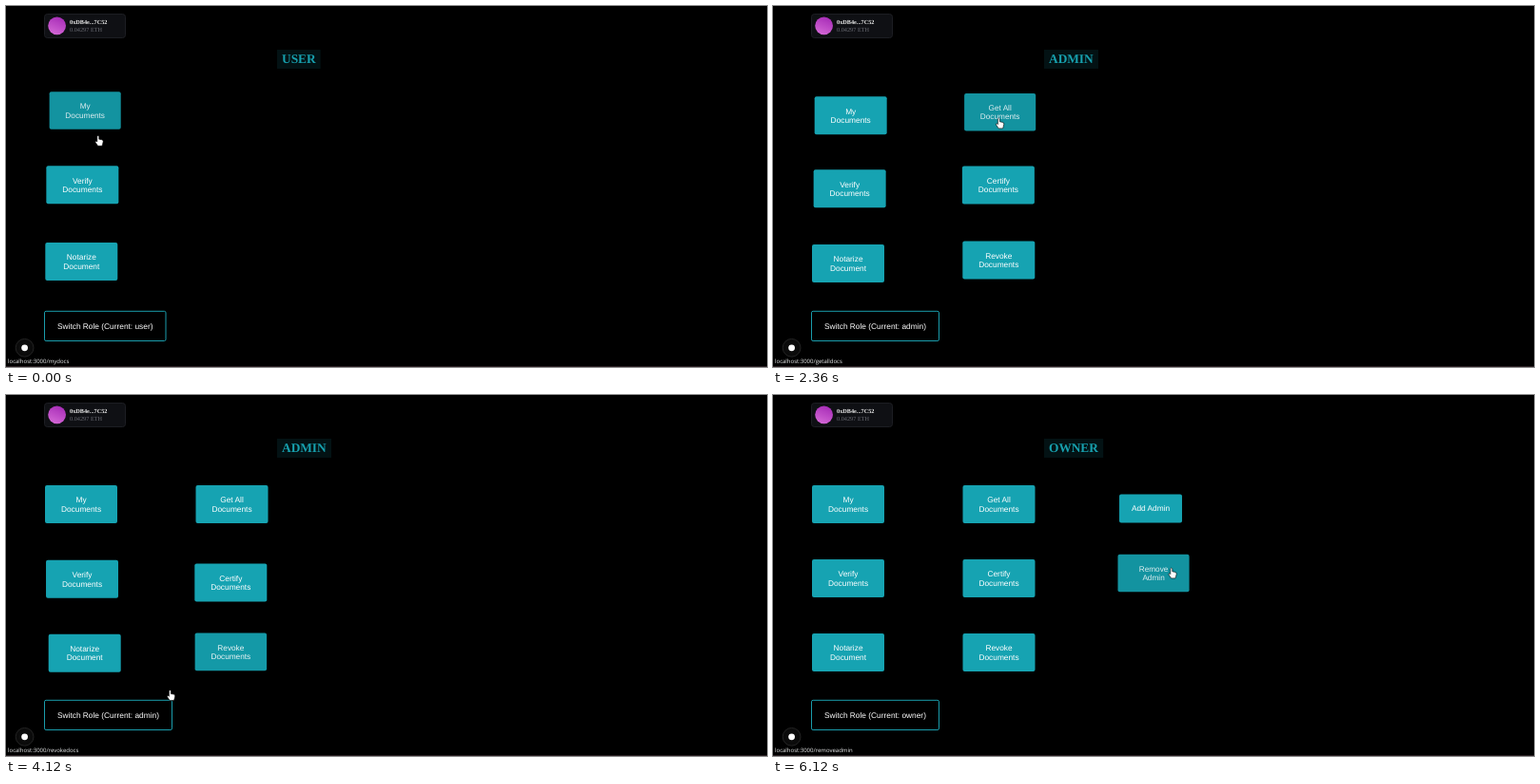
Write an HTML page that moves like this. It is 800x380 px and loops after 6.18 s.

```html
<!DOCTYPE html>
<html lang="en">
<head>
<meta charset="utf-8">
<title>Document roles</title>
<style>
  html, body { margin: 0; width: 100%; height: 100%; overflow: hidden; background: #000; }
  svg { display: block; width: 800px; height: 380px; }
  text { text-rendering: geometricPrecision; }
  .sans { font: 8.33px "Liberation Sans", Arial, sans-serif; fill: #fff; }
  .serif { font-family: "Liberation Serif", "Times New Roman", serif; }
  .status { font: 6px "Open Sans", "Noto Sans", sans-serif; fill: #eceeef; }
  .mid { text-anchor: middle; }
</style>
</head>
<body>
<svg id="stage" viewBox="0 0 800 380" xmlns="http://www.w3.org/2000/svg">
  <defs>
    <linearGradient id="orb" x1="0.7" y1="0" x2="0.3" y2="1">
      <stop offset="0" stop-color="#a62bb6"/>
      <stop offset="1" stop-color="#d468d6"/>
    </linearGradient>
  </defs>
  <rect width="800" height="380" fill="#000"/>
  <rect x="40.5" y="8.5" width="85" height="25" rx="3" fill="#0f1014" stroke="#1d1e23"/>
  <circle cx="53.6" cy="20.8" r="9.4" fill="url(#orb)"/>
  <text class="serif" x="67" y="19" font-size="6.25" font-weight="bold" fill="#eee">0xDB4e...7C52</text>
  <text class="serif" x="67" y="27.2" font-size="6.25" fill="#6c6d75">0.04297 ETH</text>
  <rect id="titleBox" x="285" y="46" height="20" fill="#031214"/>
  <text id="title" class="serif" x="290" y="60.2" font-size="13.35" font-weight="bold" fill="#17a0ae"></text>
  <g id="buttons"></g>
  <rect id="switchBox" x="40.5" y="321.3" height="31.2" rx="1.6" stroke="#1a9dac"/>
  <text id="switchText" class="sans" x="54" y="339.6"></text>
  <circle cx="19.6" cy="359.8" r="9.4" fill="#0b0b0b" stroke="#2b2b2b" stroke-width="0.8"/>
  <circle cx="19.6" cy="359.8" r="3.4" fill="#fff"/>
  <text id="status" class="status" x="2" y="376"></text>
  <rect y="379" width="800" height="1" fill="#2b2023"/>
  <path id="hand" fill="#fff" stroke="#000" stroke-width="0.6" stroke-linejoin="round"
    d="M-2.2 -4.6 Q-1.2 -6.4 -0.2 -4.6 V-1.7 L2.8 -1.1 Q4.3 -0.7 4.2 0.8 L3.6 3.4 L3 5.4 H-1.4 L-4 1.6 Q-4.4 0 -3 0.3 L-2.2 1.1 Z"/>
</svg>
<script>
const LOOP = 6180, LAG = 80, REACH = 180, PULL = 0.11, FADE = 120;
const NS = "http://www.w3.org/2000/svg";
const $ = id => document.getElementById(id);

// pointer path: time, x, y
const keys = [
  [-100, 102, 112], [0, 98, 141.6], [180, 100, 190], [330, 102, 196],
  [620, 102.5, 264], [940, 102.8, 265.4], [1060, 104, 268], [1380, 118, 332],
  [1790, 121, 335.5], [1880, 122, 334], [2330, 236, 124], [2550, 248, 122],
  [2850, 254, 190], [3000, 256, 209], [3150, 256, 212], [3450, 252, 270],
  [3670, 251, 277.5], [3900, 250, 276], [4250, 140, 334], [4700, 150, 333],
  [4760, 200, 331], [4920, 275, 310], [5250, 396, 128], [5550, 402, 122],
  [5850, 415, 178], [6120, 420, 187.5], [6180, 420, 187.5]
];

const roles = [
  { name: "user", from: 0, box: 45.6, wide: 127.5 },
  { name: "admin", from: 1650, box: 57, wide: 134 },
  { name: "owner", from: 4440, box: 62.2, wide: 134 }
];

// label lines, link, centre, lowest role that sees it, size
const buttons = [
  ["My/Documents", "mydocs", 79, 115, 0],
  ["Verify/Documents", "verifydocs", 79, 193, 0],
  ["Notarize/Document", "notarizeDocs", 79, 271, 0],
  ["Get All/Documents", "getalldocs", 237.5, 115, 1],
  ["Certify/Documents", "certifydocs", 237.5, 193, 1],
  ["Revoke/Documents", "revokedocs", 237.5, 271, 1],
  ["Add Admin", "addadmin", 395.5, 114.8, 2, 66, 30],
  ["Remove/Admin", "removeadmin", 395.8, 193, 2]
].map(([label, link, x, y, level, w = 76, h = 40]) => {
  const g = add("g", $("buttons"));
  const box = add("rect", g, { x: -w / 2, y: -h / 2, width: w, height: h, rx: 2 });
  const lines = label.split("/");
  const texts = lines.map((s, i) => {
    const t = add("text", g, { class: "sans mid", y: 3 + (i - (lines.length - 1) / 2) * 9.5 });
    t.textContent = s;
    return t;
  });
  return { link, x, y, level, w, h, g, box, texts };
});

function add(tag, parent, attrs = {}) {
  const el = document.createElementNS(NS, tag);
  set(el, attrs);
  return parent.appendChild(el);
}

function set(el, attrs) {
  for (const k in attrs) el.setAttribute(k, attrs[k]);
}

function mix(a, b, k) {
  return `rgb(${a.map((v, i) => Math.round(v + (b[i] - v) * k))})`;
}

function slope(i, c) {
  if (i < 1 || i > keys.length - 2) return 0;
  const rate = j => (keys[j + 1][c] - keys[j][c]) / (keys[j + 1][0] - keys[j][0]);
  const a = rate(i - 1), b = rate(i);
  return a * b > 0 ? 2 * a * b / (a + b) : 0;
}

// monotone cubic through the keys
function pointer(t) {
  t = Math.max(keys[0][0], Math.min(LOOP, t));
  let i = 0;
  while (i < keys.length - 2 && t > keys[i + 1][0]) i++;
  const a = keys[i], b = keys[i + 1], d = b[0] - a[0], u = (t - a[0]) / d;
  const at = c => {
    const s = u * u * (3 - 2 * u);
    return a[c] + (b[c] - a[c]) * s
      + d * u * (1 - u) * ((1 - u) * slope(i, c) - u * slope(i + 1, c));
  };
  return { x: at(1), y: at(2) };
}

function inside(p, x, y, w, h) {
  return Math.abs(p.x - 1 - x) < w / 2 + 1 && Math.abs(p.y - 5 - y) < h / 2 + 4;
}

// share of the recent past spent over a box, for soft hover changes
function hover(trail, x, y, w, h) {
  const n = trail.filter(p => inside(p, x, y, w, h)).length;
  return Math.min(1, 1.3 * n / trail.length);
}

function draw(t) {
  const level = t < roles[1].from ? 0 : t < roles[2].from ? 1 : 2;
  const role = roles[level];
  const now = pointer(t), late = pointer(t - LAG);
  const trail = Array.from({ length: 13 }, (_, i) => pointer(t - i * FADE / 12));

  $("title").textContent = role.name.toUpperCase();
  set($("titleBox"), { width: role.box });

  let link = "", best = 0;
  for (const b of buttons) {
    const seen = level >= b.level;
    set(b.g, { visibility: seen ? "visible" : "hidden" });
    if (!seen) continue;
    const dx = late.x - b.x, dy = late.y - b.y;
    const pull = PULL * Math.max(0, 1 - Math.hypot(dx, dy) / REACH);
    const k = hover(trail, b.x, b.y, b.w, b.h);
    const x = b.x + dx * pull + 2 * k, y = b.y + dy * pull - 4.9 * k;
    set(b.g, { transform: `translate(${x.toFixed(2)} ${y.toFixed(2)}) scale(${1 - 0.012 * k})` });
    set(b.box, { fill: mix([22, 163, 178], [19, 147, 160], k) });
    for (const s of b.texts) s.style.fill = mix([255, 255, 255], [222, 237, 239], k);
    if (k > best) { best = k; link = b.link; }
  }
  $("status").textContent = link && "localhost:3000/" + link;

  const k = hover(trail, 40 + role.wide / 2, 337, role.wide, 31);
  set($("switchBox"), { width: role.wide, fill: mix([0, 0, 0], [10, 80, 88], k) });
  $("switchText").textContent = `Switch Role (Current: ${role.name})`;
  set($("hand"), { transform: `translate(${now.x.toFixed(2)} ${now.y.toFixed(2)})` });
}

const start = performance.now();
function tick() {
  draw((performance.now() - start) % LOOP);
  requestAnimationFrame(tick);
}
tick();
</script>
</body>
</html>
```
